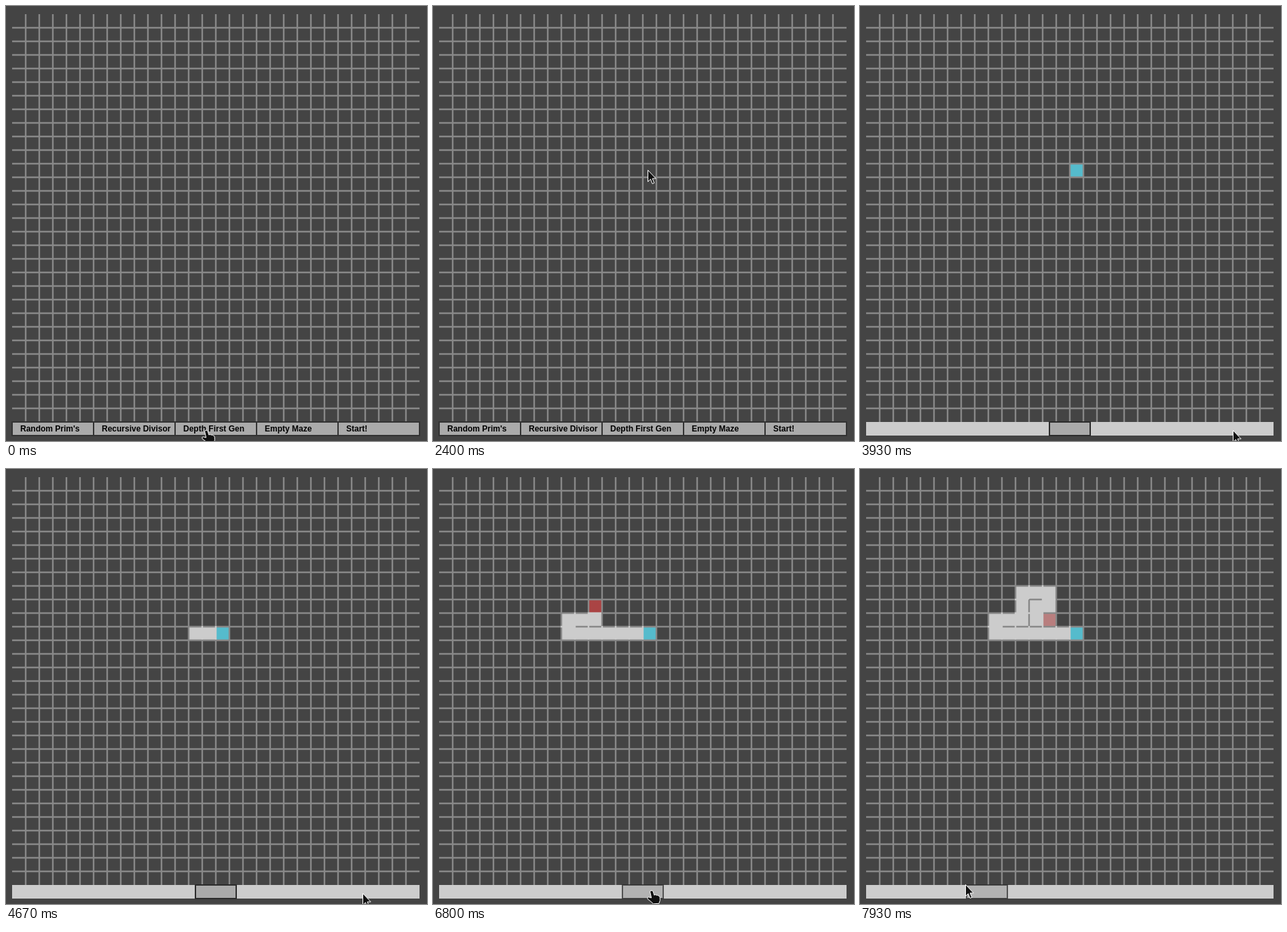
An HTML page with a canvas that plays this animation: 620x640 px, repeating every 8000 ms.

```html
<!DOCTYPE html>
<html lang="en">
<head>
<meta charset="utf-8">
<title>Maze generator</title>
<style>
html, body { margin: 0; width: 620px; height: 640px; overflow: hidden; background: #444; }
body { position: relative; }
canvas, svg, #bar, #track, #handle { position: absolute; left: 0; top: 0; }
#bar { left: 8px; top: 611px; display: flex; }
#bar div {
  box-sizing: border-box; width: 122px; height: 22px; margin-right: -2px;
  border: 2px solid #333; background: #aaa; padding-left: 11px;
  font: bold 12px/18px "Liberation Sans", Arial, sans-serif; color: #000; white-space: nowrap;
}
#track { left: 9px; top: 612px; width: 600px; height: 20px; background: #ccc; }
#handle {
  box-sizing: border-box; left: -1px; top: 611px; width: 62px; height: 22px;
  border: 2px solid #2c2c2c; background: #aaa;
}
svg { overflow: visible; width: 1px; height: 1px; }
path { fill: #111; stroke: #fff; stroke-linejoin: round; }
</style>
</head>
<body>
<canvas id="grid" width="620" height="640"></canvas>
<div id="bar">
  <div>Random Prim's</div><div>Recursive Divisor</div><div>Depth First Gen</div><div>Empty Maze</div><div>Start!</div>
</div>
<div id="track"></div>
<div id="handle"></div>
<svg id="cursor">
  <path id="arrow" d="M-.5 .5V17.5L3.4 13.8L6 20.5L8.8 19.4L6.1 12.9H11.2Z"/>
  <path id="hand" d="M-2.4 2Q-2 -.2 .2 .2Q1.8 .4 2.3 2L3.8 7Q6 5.4 7.2 7.2Q9.4 6.2 10.3 8.2Q11.8 7.8 12.2 10L12.4 14.5L10.8 19.3L2.5 19.8L-1 16.5L-6 12.6Q-7 9.8 -4.6 9.8L-.4 11Z"/>
</svg>
<script>
const LOOP = 8000, FPS = 15, CELL = 20, COUNT = 30, LEFT = 9, TOP = 12;
const PLACED = 2470, STARTED = 3930, GRABBED = 6800, RELEASED = 7767;
const RED = [170, 68, 68], LIGHT = [204, 204, 204], FADE = 150;

const $ = id => document.getElementById(id);
const g = $("grid").getContext("2d");
const mix = (a, b, k) => a + (b - a) * k;
const clamp = (v, lo, hi) => Math.min(hi, Math.max(lo, v));
const smooth = k => k * k * (3 - 2 * k);
const easeOut = k => 1 - (1 - k) ** 2;

// Pointer moves; lift bows the path upwards.
const MOVES = [
  { from: 0, to: 66, x: 297, y: 623 },
  { from: 667, to: 1400, x: 536, y: 617, lift: 16 },
  { from: 2000, to: 2400, x: 317, y: 241 },
  { from: 2533, to: 3333, x: 550, y: 624, lift: 60, ease: easeOut },
  { from: 4500, to: 5333, x: 322, y: 620 },
  { from: GRABBED, to: 6933, x: 351, y: 620 },
  { from: 6933, to: RELEASED, x: 200, y: 618 },
  { from: RELEASED, to: 7933, x: 156, y: 611 }
];

function pointerAt(t) {
  let x = 295, y = 624;
  for (const m of MOVES) {
    if (t < m.from) break;
    const k = (m.ease || smooth)(clamp((t - m.from) / (m.to - m.from), 0, 1));
    x = mix(x, m.x, k);
    y = mix(y, m.y, k) - (m.lift || 0) * Math.sin(Math.PI * k);
  }
  return { x, y };
}

// The handle keeps its distance to the pointer while dragged.
const handleAt = t => pointerAt(clamp(t, GRABBED, RELEASED)).x - 43;

// The walk starts on the cyan cell and speeds up once the slider is dragged.
const START = [15, 11], WALK = "LLLLLLURRUURRDLDR";
const DIRS = { L: [-1, 0], R: [1, 0], U: [0, -1], D: [0, 1] };
const edge = (a, b) => [a, b].map(String).sort().join("|");

let spot = START, clock = 4100, wait = 205;
const steps = [...WALK].map(m => {
  const last = spot, at = clock;
  spot = last.map((v, i) => v + DIRS[m][i]);
  if (at < GRABBED) clock += 300;
  else { clock += wait; wait *= 0.9; }
  return { cell: spot, at, door: edge(last, spot) };
});

function fillCell([c, r], color) {
  g.fillStyle = color;
  g.fillRect(LEFT + c * CELL, TOP + r * CELL, CELL, CELL);
}

function drawEdges(color, shift, wanted) {
  g.strokeStyle = color;
  g.lineWidth = 2.4;
  g.beginPath();
  for (let r = 0; r < COUNT; r++) for (let c = 0; c < COUNT; c++) {
    const x = LEFT + c * CELL, y = TOP + r * CELL;
    if (c && wanted(edge([c - 1, r], [c, r]))) {
      g.moveTo(x, y - shift);
      g.lineTo(x, y + CELL - shift);
    }
    if (r && wanted(edge([c, r - 1], [c, r]))) {
      g.moveTo(x - shift, y);
      g.lineTo(x + CELL - shift, y);
    }
  }
  g.stroke();
}

function drawGrid(t) {
  g.fillStyle = "#444";
  g.fillRect(0, 0, 620, 640);
  if (t >= PLACED) fillCell(START, "#5bc");
  const open = new Set();
  for (const { cell, at, door } of steps) {
    if (t < at) break;
    const k = Math.min(1, (t - at) / FADE);
    fillCell(cell, `rgb(${RED.map((v, i) => Math.round(mix(v, LIGHT[i], k)))})`);
    open.add(door);
  }
  drawEdges("#888", 0, e => !open.has(e));
  drawEdges("#ccc", 1, e => open.has(e));
}

function show(id, on) { $(id).style.visibility = on ? "visible" : "hidden"; }

function draw() {
  // The picture advances in steps of a fifteenth of a second.
  const tick = Math.floor((performance.now() % LOOP + 5) * FPS / 1000);
  const t = tick * 1000 / FPS % LOOP;
  const running = t >= STARTED;
  const { x, y } = pointerAt(t), hx = handleAt(t);

  drawGrid(t);
  show("bar", !running);
  show("track", running);
  show("handle", running);
  $("handle").style.transform = `translateX(${Math.round(hx)}px)`;
  $("handle").style.opacity = t >= GRABBED ? 0.76 : 1;

  const pointing = y >= 612 && (!running || (x >= hx && x <= hx + 60));
  show("hand", pointing);
  show("arrow", !pointing);
  $("cursor").style.transform = `translate(${Math.round(x)}px, ${Math.round(y)}px)`;
  requestAnimationFrame(draw);
}
draw();
</script>
</body>
</html>
```
